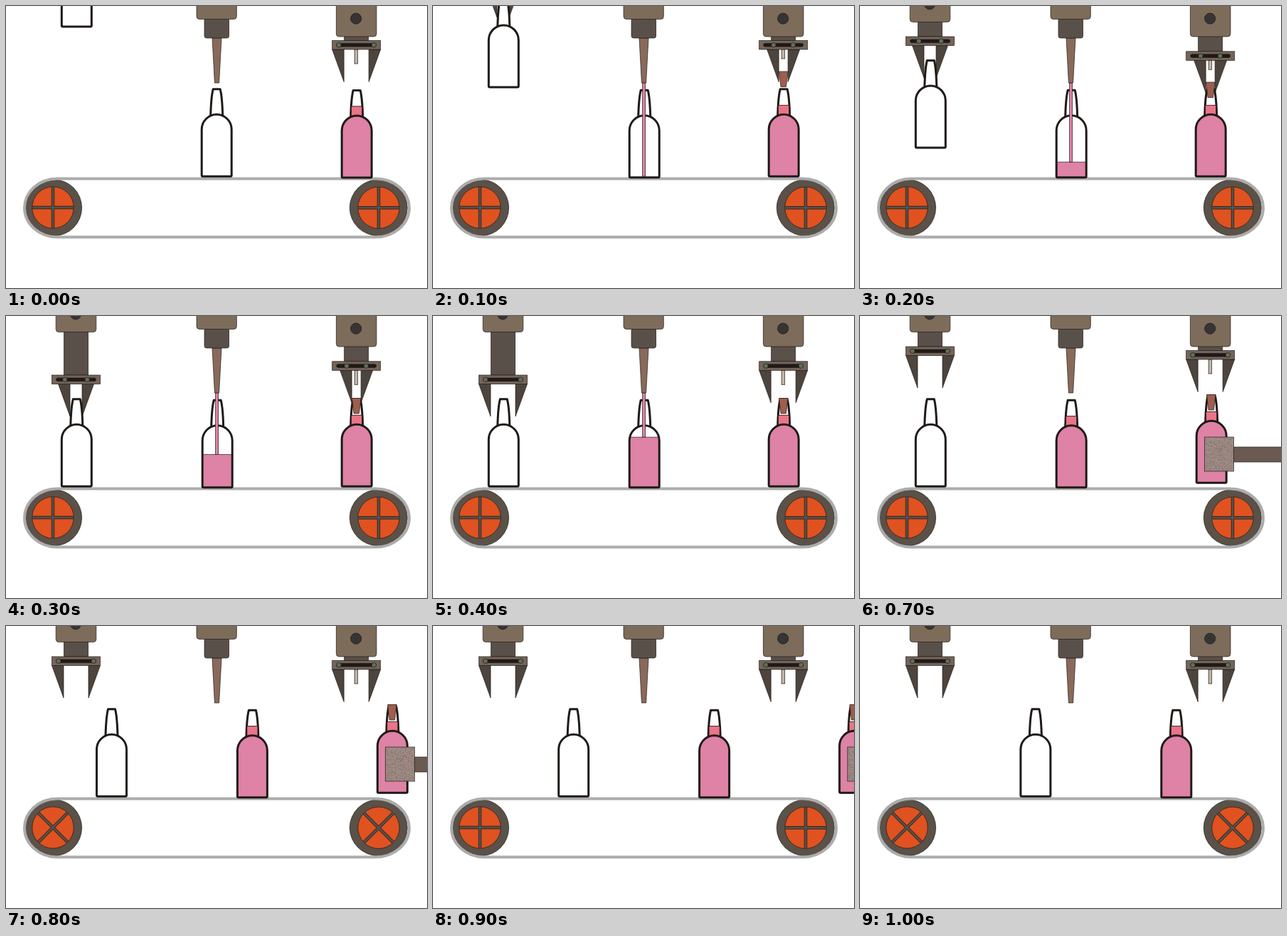
Recreate the animation shown at these times as an HTML page. Size 592 px wide and 396 px high, loop 1100 ms.

```html
<!DOCTYPE html>
<html lang="en">
<head>
<meta charset="utf-8">
<title>Bottling line</title>
<style>
html, body { margin: 0; width: 100%; height: 100%; overflow: hidden; background: #fff; }
svg { display: block; }
.thin { stroke: #1f1a17; stroke-width: .7; }
.glass { fill: none; stroke: #1f1a17; stroke-width: 3; stroke-linejoin: round; }
</style>
</head>
<body>
<svg width="592" height="396" viewBox="0 0 592 396">
  <defs>
    <path id="body" d="M0-66A21 21 0 0 1 42-66V-1.5Q42 0 40.5 0H1.5Q0 0 0-1.5Z"/>
    <path id="neck" d="M12.5-86C13-104 14-115 16-122.5H26C28-115 29-104 29.5-86Z"/>
    <clipPath id="inBody"><use href="#body"/></clipPath>
    <clipPath id="inNeck"><use href="#neck"/></clipPath>
  </defs>
  <g id="scene"></g>
</svg>
<script>
const STEP = 100, STEPS = 11, PITCH = 49.2;
const PINK = '#de82a6', ROSE = '#ea7488', STEEL = '#5a504a', BRONZE = '#7d6c5a';
const scene = document.getElementById('scene');

const rect = (x, y, w, h, fill, rx = 0, attrs = 'class="thin"') =>
  `<rect x="${x}" y="${y}" width="${w}" height="${h}" rx="${rx}" fill="${fill}" ${attrs}/>`;
const disc = (x, y, r, fill) => `<circle class="thin" cx="${x}" cy="${y}" r="${r}" fill="${fill}"/>`;
const shape = (d, fill) => `<path class="thin" d="${d}" fill="${fill}"/>`;
const at = (x, y, content) => `<g transform="translate(${x} ${y})">${content}</g>`;

const FULL = 100;

// Position is the lower left corner; level is the liquid height.
function bottle(x, y, level = 0) {
  let liquid = '';
  if (level > 0) {
    const height = Math.min(level, 90);
    liquid = rect(-1, -height, 44, height + 1, PINK, 0, 'class="thin" clip-path="url(#inBody)"');
    if (level >= FULL) liquid += rect(13.5, -level, 15, level - 84, ROSE, 0, 'class="thin" clip-path="url(#inNeck)"');
  }
  const neckLiquid = level >= FULL ? liquid.slice(liquid.lastIndexOf('<rect')) : '';
  return at(x, y, `<use href="#neck" fill="#fff"/>${neckLiquid}
    <path class="glass" d="M12.5-85C13-104 14-115 16-122.5H26C28-115 29-104 29.5-85"/>
    <use href="#body" fill="#fff"/>${liquid}<use href="#body" class="glass"/>`);
}

// Origin is the bottom centre of the housing.
function arm(x, y, reach, grip, rod = 0) {
  const base = reach + 12.5, pin = 24.7 - grip;
  const finger = side => shape(`M${side * (34 - grip)} ${base}H${side * (17.5 - grip)}v45.5Z`, '#4c443d');
  return at(x, y,
    rect(-17, -2, 34, reach + 2, STEEL) +
    rect(-28.3, -140, 56.6, 140, BRONZE, 4) + disc(-.5, -25.3, 7.6, '#363435') +
    finger(-1) + finger(1) +
    (rod ? rect(-2.6, base, 4.6, rod, '#c4b5a8') : '') +
    rect(-34, reach, 68, 12.5, '#75645a') +
    rect(-28, reach + 4, 56, 4.6, '#1f1a17', 2.3) +
    disc(-pin, reach + 6.3, 3.3, '#5f7058') + disc(pin, reach + 6.3, 3.3, '#5f7058'));
}

function nozzle() {
  return shape('M290 45H303L299.6 108H293.4Z', '#896a5a') +
    rect(279, 17, 34.5, 28, STEEL, 3) + rect(268, -30, 56.3, 48.5, BRONZE, 4);
}

function wheel(x, y, tireX, rx, angle) {
  const cross = (color, width) => `<path d="M-28.7 0H28.7M0-28.7V28.7" stroke="${color}" stroke-width="${width}"/>`;
  return `<ellipse class="thin" cx="${tireX}" cy="283.3" rx="${rx}" ry="39.5" fill="#5a5149"/>` +
    at(x, y, disc(0, 0, 29.2, '#e05220') +
      `<g transform="rotate(${angle})">${cross('#1f1a17', 4.4)}${cross('#5a5149', 3)}</g>`);
}

function conveyor(angle) {
  return wheel(66, 283, 67.3, 39.3, angle) + wheel(524, 283.3, 523.8, 40.5, angle) +
    `<path d="M72 242.4H520A47 41 0 0 1 520 324.4H72A46 41 0 0 1 72 242.4Z" fill="none" stroke="#acacac" stroke-width="4"/>`;
}

const cork = (x, y) => shape(`M${x - 6.3} ${y}h12.6l-2.6 21.5h-7.4Z`, '#a05d4e');

// Fine seeded grain for the pad surface.
const grain = (() => {
  let seed = 7, d = '';
  const random = n => (seed = seed * 16807 % 2147483647) % n;
  for (let i = 0; i < 420; i++) d += `M${1 + random(39)} ${1 + random(46)}h1`;
  return `<path d="${d}" transform="translate(0 .5)" stroke="#7d7068"/>`;
})();

function pusher(x, y) {
  return at(x, y, rect(41, 14, 140, 21, '#6b5a52') + rect(0, 0, 41, 48, '#9f8a84') + grain);
}

function draw(step) {
  const shift = Math.max(0, step - 7) * PITCH;
  const drop = Math.min(0, step - 2) * 85;
  const lowered = step === 3 || step === 4;
  const leftReach = lowered ? 60.5 : 20.5;
  const leftGrip = step < 4 ? 9 : 0;
  const rightReach = step >= 2 && step <= 4 ? 20.8 : 5.5;
  const rightGrip = step >= 1 && step <= 3 ? 11 : 0;
  const rod = step === 1 || step === 2 ? 13 : 20;
  const lift = step >= 7 ? 5 : 0;

  let out = conveyor(step > 7 && step % 2 === 0 ? 45 : 0);
  out += arm(98.5, 22.5 + drop, leftReach, leftGrip);
  out += arm(492.7, 43, rightReach, rightGrip, rod);
  out += bottle(78.3 + shift, step < 3 ? 199 + drop : 239.3, 0);

  if (step === 0) {
    out += bottle(275.2, 239.3) + bottle(472.2, 241, FULL);
  } else {
    const level = step < 5 ? Math.max(0, (step - 1) * 24.5 - 2.8) : FULL;
    out += bottle(276.2 + shift, 240.8, level);
    if (step < 5) out += rect(294.6, 108, 4, (level ? 240.8 - level : 239) - 108, PINK);
    if (step < 10) {
      const x = 472.2 + (lift ? 1 : 0) + shift;
      out += bottle(x, 239.3 - lift, FULL);
      const corkTop = step === 1 ? 92 : step === 2 ? 107 : 115.5;
      out += cork(x + 20.6, corkTop - lift);
      if (step >= 5) out += pusher(step === 5 ? 528.5 : 484.5 + shift, 175 - lift);
    }
  }
  scene.innerHTML = out + nozzle();
}

let shown = -1;
const start = performance.now();
function tick() {
  const step = Math.floor((performance.now() - start) / STEP) % STEPS;
  if (step !== shown) draw(shown = step);
  requestAnimationFrame(tick);
}
tick();
</script>
</body>
</html>
```
